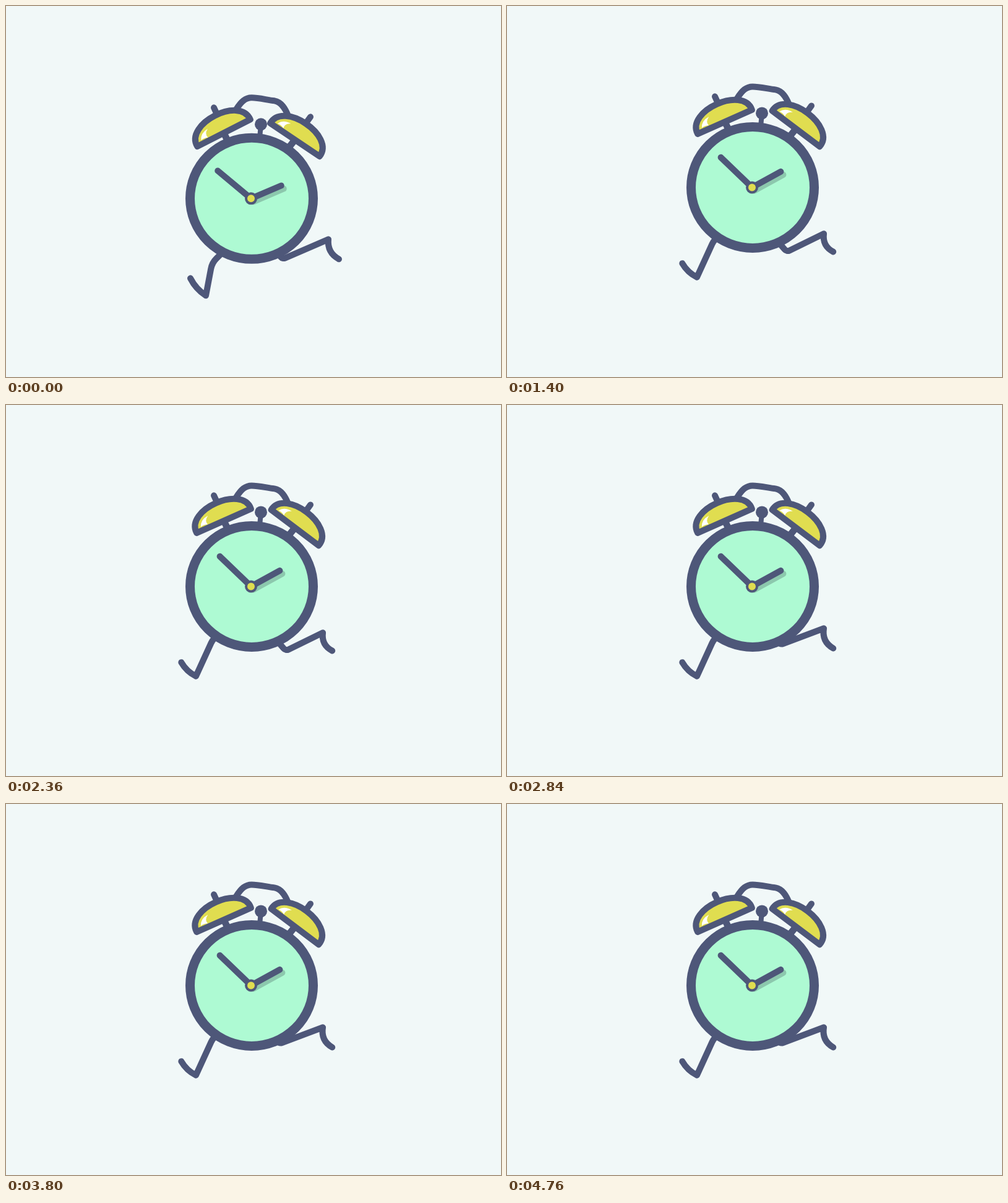
An HTML page with a canvas for the animation above (4.8 s loop, 800 by 600 pixels).

```html
<!DOCTYPE html>
<html lang="en">
<head>
<meta charset="utf-8">
<title>Running alarm clock</title>
<style>
html, body { margin: 0; height: 100%; overflow: hidden; background: #f1f8f8; }
canvas { display: block; }
</style>
</head>
<body>
<canvas id="stage" width="800" height="600"></canvas>
<script>
const ctx = document.getElementById('stage').getContext('2d');
const DARK = '#4e5779', GREEN = '#aefad3', YELLOW = '#e0dd50', BACK = '#f1f8f8';
const LOOP = 4800, STEP = 40, STRIDE = 960, BOUNCE = STRIDE / 2;
const TAU = Math.PI * 2, DEG = Math.PI / 180;

// Knee, ankle and toe relative to the dial centre, every 80 ms of a stride from heel strike
const POSES = [
  [-64, 104, -74, 157, -99, 129],
  [-55, 72, -38, 142, -76, 142],
  [-35, 105, 0, 160, -38, 160],
  [20, 112, 45, 180, 10, 195],
  [35, 108, 80, 165, 62, 197],
  [39, 93, 103, 81, 114, 113],
  [50, 98, 124, 66, 141, 98],
  [45, 104, 122, 72, 149, 100],
  [18, 115, 105, 95, 130, 122],
  [-15, 113, 35, 125, 20, 158],
  [-68, 76, -96, 135, -130, 125],
  [-60, 62, -101, 132, -126, 119]
];

const BELL = new Path2D('M-48 0C-51 -42 51 -42 48 0Z');
const SHINE = new Path2D('M-38 -6Q-34 -17 -20 -18Q-29 -13 -26 -5Q-32 -8 -38 -6Z');
const HANDLE = new Path2D('M-25 -144C-17 -157 -10 -163 0 -163C12 -163 26 -159 37 -158C48 -156 54 -146 59 -134');

const wave = (t, period) => Math.sin(TAU * t / period);

function line(x1, y1, x2, y2, width, color = DARK) {
  ctx.beginPath();
  ctx.moveTo(x1, y1);
  ctx.lineTo(x2, y2);
  ctx.lineWidth = width;
  ctx.strokeStyle = color;
  ctx.stroke();
}

function disc(x, y, r, color) {
  ctx.beginPath();
  ctx.arc(x, y, r, 0, TAU);
  ctx.fillStyle = color;
  ctx.fill();
}

// Catmull-Rom through the poses
function poseAt(phase) {
  const n = POSES.length, pos = phase / STRIDE * n, i = Math.floor(pos), u = pos - i;
  const [a, b, c, d] = [-1, 0, 1, 2].map(k => POSES[(i + k + n) % n]);
  return b.map((v, j) => v + u / 2 * (c[j] - a[j] +
    u * (2 * a[j] - 5 * v + 4 * c[j] - d[j] + u * (3 * (v - c[j]) + d[j] - a[j]))));
}

function leg(t, kneeDrop) {
  const phase = t % STRIDE;
  const [kx, ky, ax, ay, tx, ty] = poseAt(phase);
  const drop = kneeDrop * Math.max(0, 1 - Math.abs(phase - 440) / 120);
  const knee = [kx + drop, ky + drop], ankle = [ax, ay + drop * 0.7], toe = [tx, ty + drop * 0.4];
  const bend = 0.1 - 0.25 * Math.cos(TAU * (phase + 60) / STRIDE);
  const dx = toe[0] - ankle[0], dy = toe[1] - ankle[1];
  ctx.beginPath();
  ctx.moveTo(0, 40);
  ctx.arcTo(...knee, ...ankle, 19 + 13 * Math.cos(TAU * phase / STRIDE));
  ctx.lineTo(...ankle);
  ctx.quadraticCurveTo(ankle[0] + dx / 2 - dy * bend, ankle[1] + dy / 2 + dx * bend, ...toe);
  ctx.lineWidth = 10;
  ctx.strokeStyle = DARK;
  ctx.stroke();
}

function bell(x, y, degrees) {
  ctx.save();
  ctx.translate(x, y);
  ctx.rotate(degrees * DEG);
  ctx.fillStyle = YELLOW;
  ctx.fill(BELL);
  ctx.fillStyle = '#fff';
  ctx.fill(SHINE);
  ctx.lineWidth = 10;
  ctx.strokeStyle = DARK;
  ctx.stroke(BELL);
  ctx.restore();
}

function hand(degrees, length, color = DARK, dx = 0, dy = 0) {
  const x = -1 + dx, a = degrees * DEG;
  line(x, dy, x + length * Math.cos(a), dy - length * Math.sin(a), 10, color);
}

function draw(t) {
  const shake = -3.5 * wave(t + 40, 240);
  const droop = wave(t + 20, BOUNCE);
  ctx.fillStyle = BACK;
  ctx.fillRect(0, 0, 800, 600);
  ctx.save();
  ctx.translate(397, 290 + 37 * Math.cos(TAU * (t - 73) / BOUNCE));
  ctx.lineCap = ctx.lineJoin = 'round';

  leg(t, 10);
  leg(t + BOUNCE, 0);

  ctx.lineWidth = 10;
  ctx.stroke(HANDLE);
  line(-61, -147, -55, -134, 10);
  line(95, -132, 87, -121, 10);
  line(-45, -106, -38, -92, 11);
  line(70, -95, 58, -80, 11);
  line(13, -98, 15, -120, 8);
  disc(15, -120, 10, DARK);
  bell(-45, -106, -24 + shake);
  bell(70, -95, 37 + shake);

  ctx.beginPath();
  ctx.ellipse(0, 0, 99.5, 98, 0, 0, TAU);
  ctx.fillStyle = GREEN;
  ctx.fill();
  ctx.lineWidth = 15;
  ctx.stroke();

  const hour = 26 - 11 * droop;
  hand(hour, 53, '#8cc8ad', 4, 5);
  hand(hour, 53);
  hand(138.1 + 8 * droop, 70);
  disc(-1, 0, 10, DARK);
  disc(-1, 0, 6, YELLOW);
  ctx.restore();
}

function tick() {
  const t = performance.now() % LOOP;
  draw(Math.floor(t / STEP) * STEP);
  requestAnimationFrame(tick);
}
tick();
</script>
</body>
</html>
```
